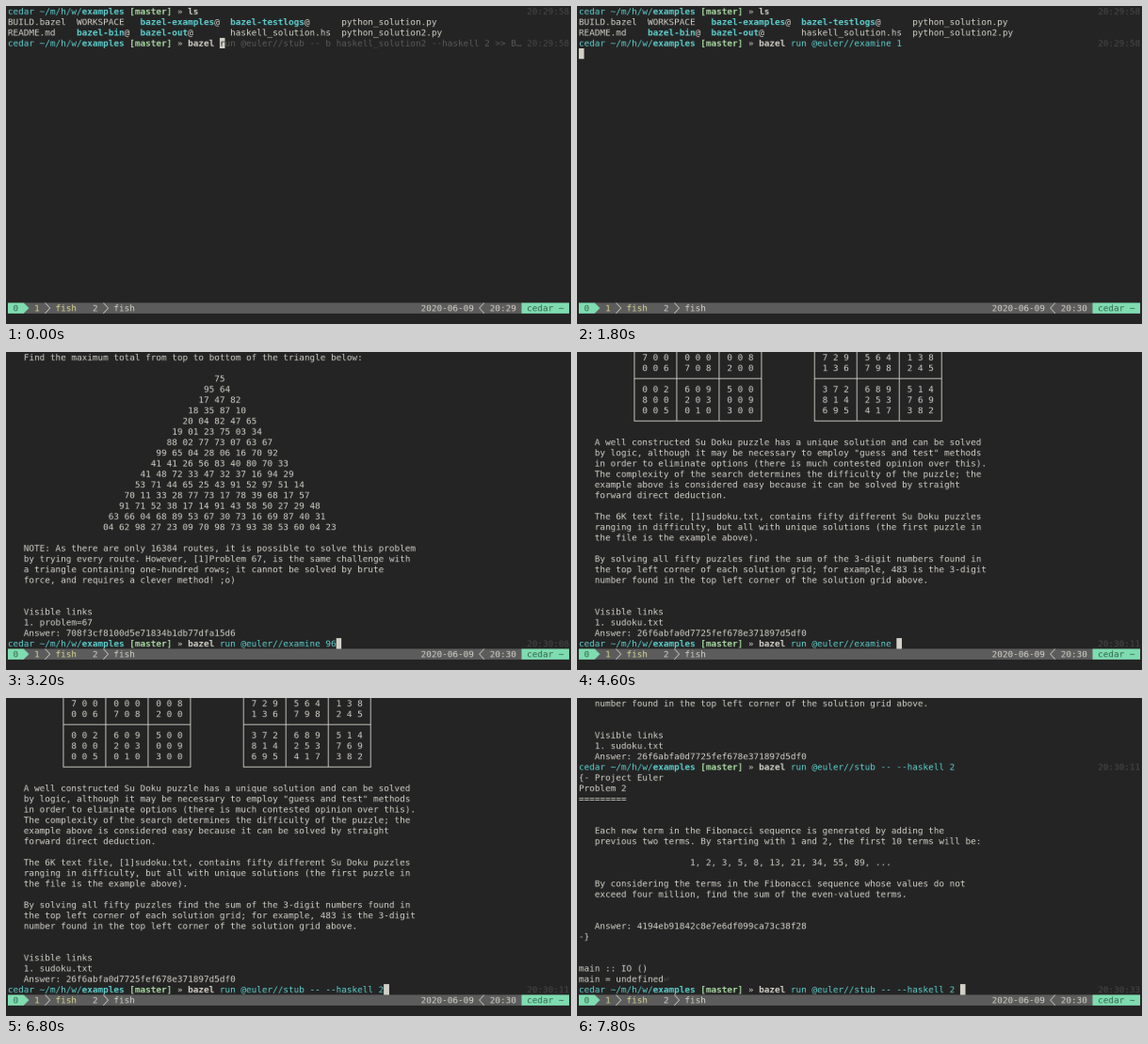
An HTML page with a canvas for the animation above (8 s loop, 600 px wide and 338 px high).

```html
<!DOCTYPE html>
<html lang="en">
<head>
<meta charset="utf-8">
<title>Terminal session</title>
<style>
html, body { margin: 0; width: 100%; height: 100%; overflow: hidden; background: #242424; }
canvas { display: block; width: 600px; height: 338px; }
</style>
</head>
<body>
<canvas id="stage"></canvas>
<script>
const LOOP = 8000, W = 600, H = 338;
const CELL = 12, ROW = 24, PAD = 4, BASE = 19, ROWS = 28;
const FONT = '20px "DejaVu Sans Mono", monospace';
const C = {
  bg: '#242424', fg: '#d3d0c8', cyan: '#5fcfcf', branch: '#a9d8a2',
  ghost: '#595959', stamp: '#484848', bar: '#5c5c5c', green: '#7fdcb0',
  ink: '#35654f', active: '#d9d690'
};

// The terminal is drawn at full size, then scaled down to the stage.
const term = document.createElement('canvas');
term.width = 1280;
term.height = 720;
const g = term.getContext('2d');
const stage = document.getElementById('stage');
const dpr = window.devicePixelRatio || 1;
stage.width = W * dpr;
stage.height = H * dpr;
const out = stage.getContext('2d');
out.imageSmoothingQuality = 'high';

// A line is a list of spans: [column, text, colour, bold].
const USER = 'cedar', TYPE_COL = 34;
const SUGGEST = 'bazel run @euler//stub -- b haskell_solution2 --haskell 2 >> BUILD.bazel';
const GHOST_WIDTH = 63;

function plain(text) {
  return text.split('\n').map(s => [[0, s, C.fg]]);
}

function prompt(cmd, stamp) {
  const cut = (cmd + ' ').indexOf(' ');
  return [
    [0, USER + ' ~/m/h/w/', C.cyan],
    [14, 'examples', C.cyan, true],
    [23, '[master]', C.branch, true],
    [32, '»', C.fg],
    [TYPE_COL, cmd.slice(0, cut), C.fg, true],
    [TYPE_COL + cut, cmd.slice(cut), C.cyan],
    [98, stamp, C.stamp]
  ];
}

function link(col, name) {
  return [[col, name, C.cyan, true], [col + name.length, '@', C.fg]];
}

const listing = [
  [[0, 'BUILD.bazel', C.fg], [13, 'WORKSPACE', C.fg], ...link(25, 'bazel-examples'),
    ...link(42, 'bazel-testlogs'), [63, 'python_solution.py', C.fg]],
  [[0, 'README.md', C.fg], ...link(13, 'bazel-bin'), ...link(25, 'bazel-out'),
    [42, 'haskell_solution.hs', C.fg], [63, 'python_solution2.py', C.fg]]
];

const sums = plain(`Problem 1
=========


   If we list all the natural numbers below 10 that are multiples of 3 or
   5, we get 3, 5, 6 and 9. The sum of these multiples is 23.

   Find the sum of all the multiples of 3 or 5 below 1000.


   Answer: e1edf9d1967ca96767dcc2b2d6df69f4`);

const triangle = `75
95 64
17 47 82
18 35 87 10
20 04 82 47 65
19 01 23 75 03 34
88 02 77 73 07 63 67
99 65 04 28 06 16 70 92
41 41 26 56 83 40 80 70 33
41 48 72 33 47 32 37 16 94 29
53 71 44 65 25 43 91 52 97 51 14
70 11 33 28 77 73 17 78 39 68 17 57
91 71 52 38 17 14 91 43 58 50 27 29 48
63 66 04 68 89 53 67 30 73 16 69 87 40 31
04 62 98 27 23 09 70 98 73 93 38 53 60 04 23`
  .split('\n').map((s, i) => [[Math.floor(39 - 1.5 * i), s, C.fg]]);

const paths = [
  ...plain('   Find the maximum total from top to bottom of the triangle below:\n'),
  ...triangle,
  ...plain(`
   NOTE: As there are only 16384 routes, it is possible to solve this problem
   by trying every route. However, [1]Problem 67, is the same challenge with
   a triangle containing one-hundred rows; it cannot be solved by brute
   force, and requires a clever method! ;o)


   Visible links
   1. problem=67
   Answer: 708f3cf8100d5e71834b1db77dfa15d6`)
];

// Two grids side by side, at columns 10 and 44.
function gridRow(left, right) {
  const row = s => '│' + s.split(' ').map(p => ' ' + [...p].join(' ') + ' │').join('');
  return [[10, row(left), C.fg], [44, row(right), C.fg]];
}
function gridRule(a, b, c) {
  const s = a + Array(3).fill('─'.repeat(7)).join(b) + c;
  return [[10, s, C.fg], [44, s, C.fg]];
}

const sudoku = [
  gridRow('700 000 008', '729 564 138'),
  gridRow('006 708 200', '136 798 245'),
  gridRule('├', '┼', '┤'),
  gridRow('002 609 500', '372 689 514'),
  gridRow('800 203 009', '814 253 769'),
  gridRow('005 010 300', '695 417 382'),
  gridRule('└', '┴', '┘'),
  ...plain(`
   A well constructed Su Doku puzzle has a unique solution and can be solved
   by logic, although it may be necessary to employ "guess and test" methods
   in order to eliminate options (there is much contested opinion over this).
   The complexity of the search determines the difficulty of the puzzle; the
   example above is considered easy because it can be solved by straight
   forward direct deduction.

   The 6K text file, [1]sudoku.txt, contains fifty different Su Doku puzzles
   ranging in difficulty, but all with unique solutions (the first puzzle in
   the file is the example above).

   By solving all fifty puzzles find the sum of the 3-digit numbers found in
   the top left corner of each solution grid; for example, 483 is the 3-digit
   number found in the top left corner of the solution grid above.


   Visible links
   1. sudoku.txt
   Answer: 26f6abfa0d7725fef678e371897d5df0`)
];

const stub = [
  ...plain(`{- Project Euler
Problem 2
=========


   Each new term in the Fibonacci sequence is generated by adding the
   previous two terms. By starting with 1 and 2, the first 10 terms will be:

                     1, 2, 3, 5, 8, 13, 21, 34, 55, 89, ...

   By considering the terms in the Fibonacci sequence whose values do not
   exceed four million, find the sum of the even-valued terms.


   Answer: 4194eb91842c8e7e6df099ca73c38f28
-}


main :: IO ()`),
  [[0, 'main = undefined', C.fg], [16, '⏎', C.ghost]]
];

// Scrollback after each command: entered (waiting) and finished.
const RUN = 'bazel run @euler//', EXAM = RUN + 'examine ', STUB = RUN + 'stub -- ';
const T1 = '20:29:58', T2 = '20:30:05', T3 = '20:30:08', T4 = '20:30:11', T5 = '20:30:33';
const log0 = [prompt('ls', T1), ...listing];
const wait1 = [...log0, prompt(EXAM + '1', T1)];
const log1 = [...wait1, ...sums];
const wait2 = [...log1, prompt(EXAM + '18', T2)];
const log2 = [...wait2, ...paths];
const log3 = [...log2, prompt(EXAM + '96', T3), ...sudoku];
const wait4 = [...log3, prompt(STUB + '--haskell 2', T4)];
const log4 = [...wait4, ...stub];

// [start, scrollback, prompt time, typed]; no prompt while a command runs.
const steps = [
  [0, log0, T1, 'bazel '],
  [400, log0, T1, 'bazel ru'],
  [600, log0, T1, 'bazel run '],
  [800, log0, T1, 'bazel run @eu'],
  [1000, log0, T1, RUN],
  [1200, log0, T1, RUN + 'exa'],
  [1400, log0, T1, EXAM],
  [1600, log0, T1, EXAM + '1'],
  [1800, wait1],
  [2000, log1, T2, ''],
  [2200, log1, T2, EXAM + '18'],
  [2400, wait2],
  [2600, log2, T3, ''],
  [2800, log2, T3, EXAM + '18'],
  [3000, log2, T3, EXAM],
  [3200, log2, T3, EXAM + '96'],
  [3600, log3, T4, ''],
  [4000, log3, T4, EXAM + '96'],
  [4600, log3, T4, EXAM],
  [4800, log3, T4, RUN + 'exa'],
  [5000, log3, T4, RUN],
  [5200, log3, T4, RUN + 'st'],
  [5400, log3, T4, RUN + 'stub'],
  [5600, log3, T4, RUN + 'stub --'],
  [5800, log3, T4, STUB],
  [6000, log3, T4, STUB + '-'],
  [6200, log3, T4, STUB + '--ha'],
  [6400, log3, T4, STUB + '--haskell'],
  [6600, log3, T4, STUB + '--haskell '],
  [6800, log3, T4, STUB + '--haskell 2'],
  [7200, wait4],
  [7400, log4, T5, ''],
  [7600, log4, T5, STUB + '--haskell 2'],
  [7800, log4, T5, STUB + '--haskell 2 ']
];

const colX = col => PAD + col * CELL;

function fillCells(col, row, count, color) {
  g.fillStyle = color;
  g.fillRect(colX(col), row * ROW, count * CELL, ROW);
}

// Arms of the box-drawing characters: left, right, up, down.
const ARMS = { '─': 'lr', '│': 'ud', '├': 'rud', '┤': 'lud', '┼': 'lrud', '└': 'ru', '┘': 'lu', '┴': 'lru' };

function boxChar(arms, x, y) {
  const cx = x + 5, cy = y + 11;
  if (arms.includes('l')) g.fillRect(x, cy, 7, 2);
  if (arms.includes('r')) g.fillRect(cx, cy, 7, 2);
  if (arms.includes('u')) g.fillRect(cx, y, 2, 13);
  if (arms.includes('d')) g.fillRect(cx, cy, 2, 13);
}

function text(col, row, str, color, bold) {
  g.font = (bold ? 'bold ' : '') + FONT;
  g.fillStyle = color;
  [...str].forEach((ch, i) => {
    const x = colX(col + i), y = row * ROW;
    if (ARMS[ch]) boxChar(ARMS[ch], x, y);
    else if (ch !== ' ') g.fillText(ch, x, y + BASE);
  });
}

function chevron(col, dir) {
  const mid = colX(col) + CELL / 2, y = ROWS * ROW;
  g.strokeStyle = C.fg;
  g.lineWidth = 1.6;
  g.beginPath();
  g.moveTo(mid - 5.5 * dir, y);
  g.lineTo(mid + 5.5 * dir, y + ROW / 2);
  g.lineTo(mid - 5.5 * dir, y + ROW);
  g.stroke();
}

function statusBar(clock) {
  const row = ROWS, x = colX(3), y = row * ROW;
  fillCells(0, row, 106, C.bar);
  fillCells(0, row, 3, C.green);
  g.beginPath();
  g.moveTo(x, y);
  g.lineTo(x + CELL, y + ROW / 2);
  g.lineTo(x, y + ROW);
  g.fill();
  text(1, row, '0', C.ink);
  text(5, row, '1', C.active);
  chevron(7, 1);
  text(9, row, 'fish', C.active);
  text(16, row, '2', C.fg);
  chevron(18, 1);
  text(20, row, 'fish', C.fg);
  text(78, row, '2020-06-09', C.fg);
  chevron(89, -1);
  text(91, row, clock, C.fg);
  fillCells(97, row, 9, C.green);
  text(98, row, USER + ' ~', C.ink);
}

function ghostFor(typed) {
  if (!typed || !SUGGEST.startsWith(typed)) return '';
  return (SUGGEST.slice(0, GHOST_WIDTH - 1) + '…').slice(typed.length);
}

function draw(t) {
  const [, log, stamp, typed = ''] = steps.findLast(s => s[0] <= t);
  const lines = [...log, stamp ? prompt(typed, stamp) : []].slice(-ROWS);
  const row = lines.length - 1;
  const col = stamp ? TYPE_COL + typed.length : 0;
  const ghost = stamp ? ghostFor(typed) : '';

  g.fillStyle = C.bg;
  g.fillRect(0, 0, term.width, term.height);
  lines.forEach((line, i) => line.forEach(([c, ...span]) => text(c, i, ...span)));
  text(col, row, ghost, C.ghost);
  fillCells(col, row, 1, C.fg);
  text(col, row, ghost.slice(0, 1), C.bg);
  statusBar(t < 1000 ? '20:29' : '20:30');
  out.drawImage(term, 0, 0, stage.width, stage.height);
}

const start = performance.now();
function tick() {
  draw((performance.now() - start) % LOOP);
  requestAnimationFrame(tick);
}
tick();
</script>
</body>
</html>
```
